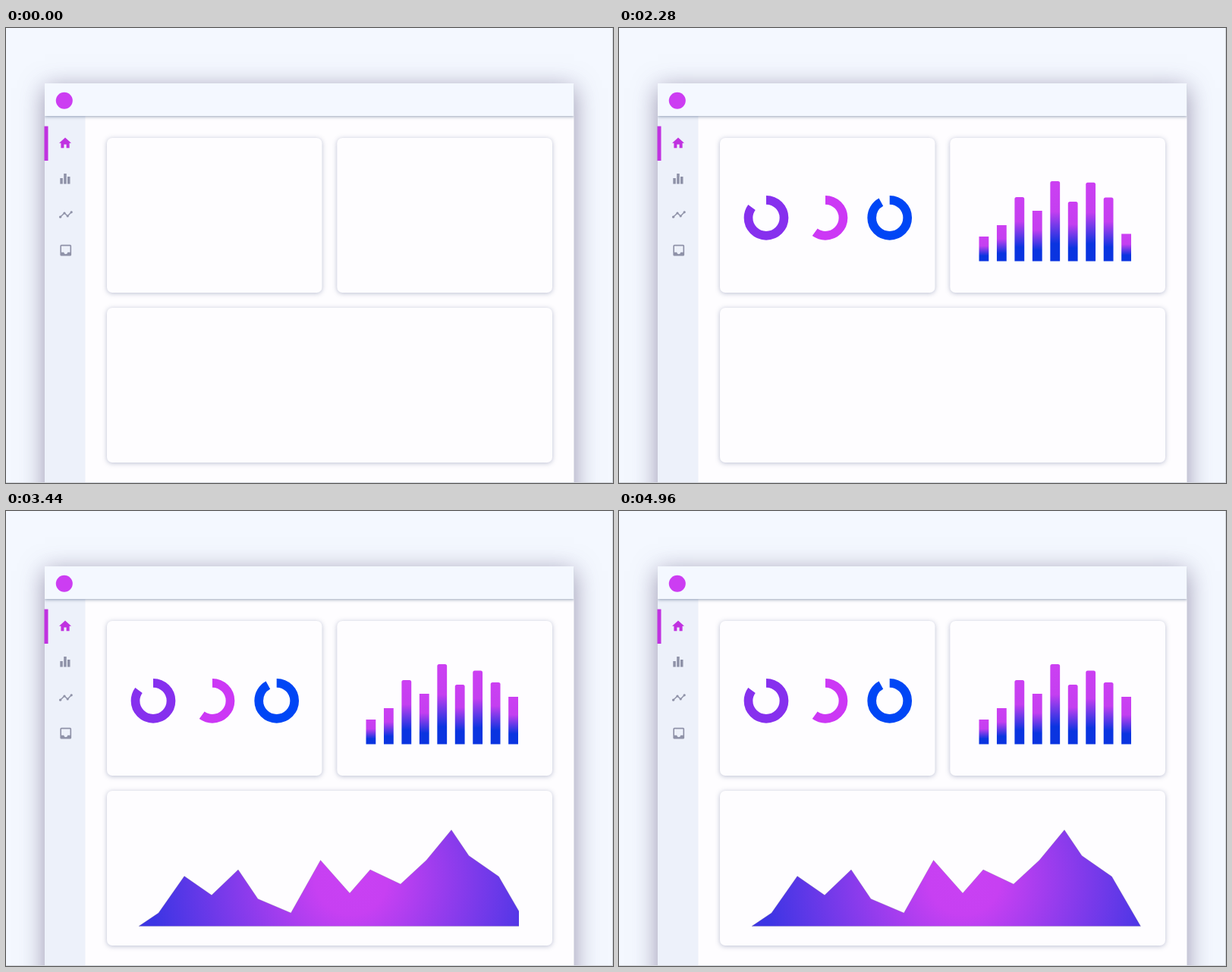
Animation, 800 px wide and 600 px high, one loop 5000 ms. Source, as an HTML page with a canvas:

```html
<!DOCTYPE html>
<html lang="en">
<head>
<meta charset="utf-8">
<title>Dashboard</title>
<style>
html, body { margin: 0; width: 100%; height: 100%; overflow: hidden; background: #f4f8ff; }
canvas { display: block; width: 800px; height: 600px; }
</style>
</head>
<body>
<canvas id="stage" width="800" height="600"></canvas>
<script>
const LOOP = 5000;
const PINK = '#c032e0', GREY = '#8f92a8', WHITE = '#fefdff', PALE = '#f4f8ff';
const stage = document.getElementById('stage');
const view = stage.getContext('2d');

const RINGS = [
  { x: 194, share: 0.85, color: '#8630ee' },
  { x: 272, share: 0.6, color: '#cc38f5' },
  { x: 356.7, share: 0.92, color: '#0046f5' }
];
const BAR_TOPS = [275, 260, 223, 241, 202, 229, 210.5, 226, 245];
const BAR_BASE = 307.5;
const AREA = [
  [175, 547.5], [201, 530], [235, 481.5], [271, 506.5], [306, 473], [332, 511.5],
  [375.5, 530], [414.5, 460.5], [453, 504], [480, 473], [520, 492], [554, 460.5],
  [587, 420.5], [610, 454.5], [649.5, 482], [687.5, 547.5]
];

// Cubic Bezier easing, solved by bisection.
function bezier(x1, y1, x2, y2) {
  const at = (a, b, s) => 3 * a * s * (1 - s) ** 2 + 3 * b * s * s * (1 - s) + s ** 3;
  return t => {
    if (t <= 0) return 0;
    if (t >= 1) return 1;
    let low = 0, high = 1;
    for (let i = 0; i < 24; i++) {
      const mid = (low + high) / 2;
      if (at(x1, x2, mid) < t) low = mid; else high = mid;
    }
    return at(y1, y2, low);
  };
}
const overshoot = bezier(0.3, 0.7, 0.3, 1.3);
const ease = bezier(0.25, 0.1, 0.25, 1);

function box(c, x, y, w, h, fill, radius = 0) {
  c.fillStyle = fill;
  c.beginPath();
  c.roundRect(x, y, w, h, radius);
  c.fill();
}

function shadowBox(c, x, y, w, h, fill, radius, color, blur, dy) {
  c.save();
  c.shadowColor = color;
  c.shadowBlur = blur;
  c.shadowOffsetY = dy;
  box(c, x, y, w, h, fill, radius);
  c.restore();
}

function dot(c, x, y, r, fill) {
  c.fillStyle = fill;
  c.beginPath();
  c.arc(x, y, r, 0, Math.PI * 2);
  c.fill();
}

function trace(c, points) {
  c.beginPath();
  points.forEach(([x, y]) => c.lineTo(x, y));
}

function icon(c, x, y, scale, path, color) {
  c.save();
  c.translate(x, y);
  c.scale(scale, scale);
  c.fillStyle = color;
  c.fill(new Path2D(path));
  c.restore();
}

function drawIcons(c) {
  box(c, 50.5, 129.5, 5, 45.5, PINK);
  icon(c, 68.4, 142.2, 0.8, 'M10 20v-6h4v6h5v-8h3L12 3 2 12h3v8z', PINK);

  [[71.3, 198], [76.2, 192], [81, 196]].forEach(([x, y]) => box(c, x, y, 3.5, 205.6 - y, GREY));

  const trend = [[71.6, 249.2], [77, 244], [81.2, 248], [86.2, 242.8]];
  c.strokeStyle = GREY;
  c.lineWidth = 1.5;
  trace(c, trend);
  c.stroke();
  trend.forEach(([x, y]) => dot(c, x, y, 1.6, GREY));

  icon(c, 68.9, 283.4, 0.82,
    'M19 3H5a2 2 0 0 0-2 2v14a2 2 0 0 0 2 2h14a2 2 0 0 0 2-2V5a2 2 0 0 0-2-2z' +
    'm0 12h-4a3 3 0 0 1-6 0H5V5h14z', GREY);
}

function makeBackdrop() {
  const layer = document.createElement('canvas');
  layer.width = 800;
  layer.height = 600;
  const c = layer.getContext('2d');
  box(c, 0, 0, 800, 600, PALE);
  shadowBox(c, 51, 73, 697.5, 600, WHITE, 0, 'rgba(80,70,110,0.55)', 30, 6);
  box(c, 51, 116, 53.5, 484, '#edf1fa');

  c.save();
  c.beginPath();
  c.rect(51, 73, 697.5, 527);
  c.clip();
  shadowBox(c, 51, 73, 697.5, 43, PALE, 0, 'rgba(65,85,120,0.55)', 4, 1);
  c.restore();

  [[133, 145, 283.5], [436.3, 145, 283.7], [133, 369, 587]].forEach(([x, y, w]) =>
    shadowBox(c, x, y, w, 204, WHITE, 7, 'rgba(75,90,135,0.38)', 6, 1));

  dot(c, 76.8, 95.8, 11, '#cc3df2');
  drawIcons(c);
  box(c, 799, 0, 1, 600, '#d0d3da');
  box(c, 0, 599, 800, 1, '#d0d3da');
  return layer;
}

function drawRings(c, time) {
  RINGS.forEach(({ x, share, color }, i) => {
    const amount = share * overshoot((time - 984 - i * 100) / 550);
    if (amount <= 0) return;
    c.strokeStyle = color;
    c.lineWidth = 11.7;
    c.beginPath();
    c.arc(x, 250.3, 23.5, -Math.PI / 2, (amount * 2 - 0.5) * Math.PI);
    c.stroke();
  });
}

function drawBars(c, time) {
  BAR_TOPS.forEach((top, i) => {
    const height = (BAR_BASE - top) * overshoot((time - 1406 - i * 100) / 350);
    if (height <= 0) return;
    const y = BAR_BASE - height;
    const fill = c.createLinearGradient(0, y, 0, BAR_BASE);
    fill.addColorStop(0, '#cc40f2');
    fill.addColorStop(0.38, '#c43ff0');
    fill.addColorStop(0.78, '#0a34e0');
    const radius = top < 230 ? Math.min(2.5, height / 2) : 0;
    box(c, 474.5 + i * 23.46, y, 12.8, height, fill, [radius, radius, 0, 0]);
  });
}

const areaFill = view.createRadialGradient(455, 485, 0, 455, 485, 265);
areaFill.addColorStop(0, '#c941f3');
areaFill.addColorStop(0.18, '#c740f2');
areaFill.addColorStop(1, '#3c35e4');

function drawArea(c, time) {
  const shown = ease((time - 2804) / 800);
  if (shown <= 0) return;
  c.save();
  c.beginPath();
  c.rect(174, 410, 515 * shown, 140);
  c.clip();
  trace(c, AREA);
  c.closePath();
  c.fillStyle = areaFill;
  c.fill();
  c.strokeStyle = 'rgba(110,105,140,0.35)';
  c.lineWidth = 0.7;
  c.stroke();
  c.restore();
}

const backdrop = makeBackdrop();

function render() {
  const time = performance.now() % LOOP;
  view.drawImage(backdrop, 0, 0);
  drawRings(view, time);
  drawBars(view, time);
  drawArea(view, time);
  requestAnimationFrame(render);
}
render();
</script>
</body>
</html>
```
